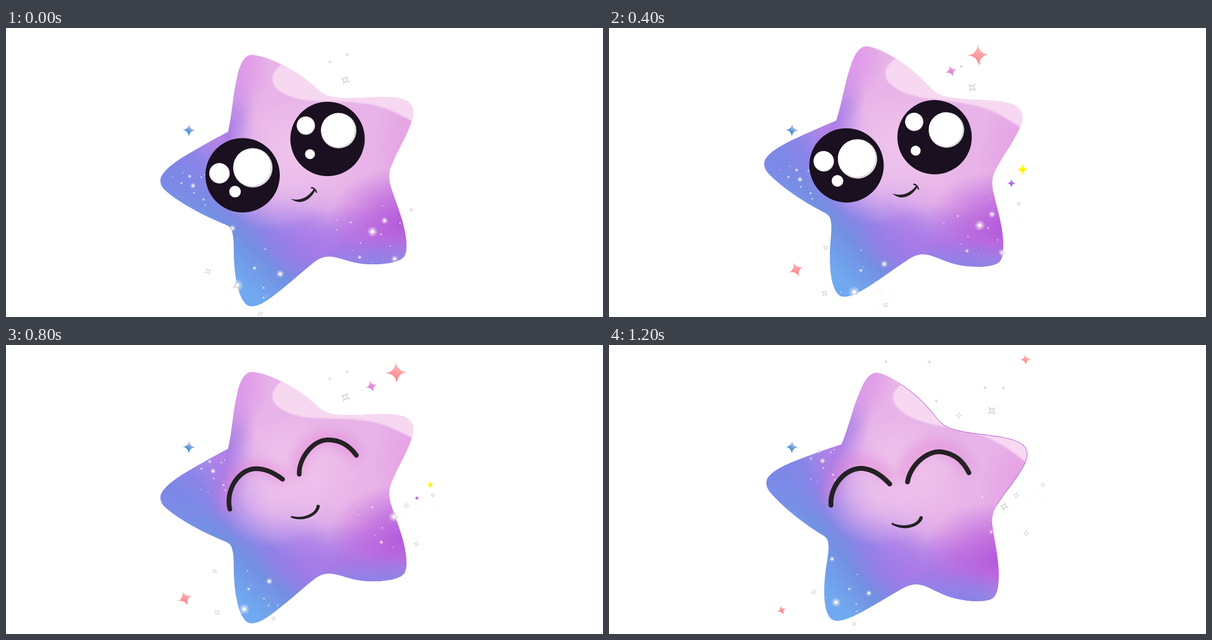
Animation of 1075 by 521 pixels, one loop 1400 ms. Source, as an HTML page with a canvas:

```html
<!DOCTYPE html>
<html lang="en">
<head>
<meta charset="utf-8">
<title>Smiling star</title>
<style>
html, body { margin: 0; width: 100%; height: 100%; overflow: hidden; background: #fff; }
canvas { display: block; }
</style>
</head>
<body>
<canvas id="stage" width="1075" height="521"></canvas>
<script>
const ctx = document.getElementById('stage').getContext('2d');
const STEP = 200, STEPS = 7;
const RAD = Math.PI / 180;
const mix = (a, b, u) => a + (b - a) * u;

const body = new Path2D(`M400,187 C408,150 409,115 417,85 C422,62 431,49 442,48.5
  C465,49 500,66 525,82 C548,97 562,113 573,119 C585,127 612,127 640,126
  C670,124.5 695,123 713,128 C728,132 735,143 733,157 C729,182 710,212 698,239
  C690,256 688,266 692,283 C700,310 716,345 720,377 C722,395 722,403 717,412
  C708,423 680,426.5 655,426 C630,425 615,419 600,415 C582,410 570,411 555,422
  C530,442 500,470 473,489 C457,500 446,503.5 437,501 C420,493 413,455 411,425
  C409,400 412,380 406,364 C402,355 395,355 380,348 C345,333 310,312 292,297
  C280,288 277,280 278.5,271 C283,258 300,244 325,229 C350,214 375,200 400,187Z`);
const shine = new Path2D(`M499,64 C478,76 472,99 492,113 C515,129 545,132 575,132
  C610,133 640,134 662,139 C692,146 712,158 736,170 L780,120 L600,60Z`);
const lids = new Path2D(`M403,296 C395,262 418,225 448,223 C468,222 485,232 498,242
  M528,233 C527,205 552,171 580,171 C605,171 621,185 631,199`);
const openSmile = new Path2D(`M513,308 C530,313 546,304 555,289 L557,292
  C549,310 530,321 513,308Z`);
const smileTip = new Path2D('M550,288 Q556,288 559,296');
const shutSmile = new Path2D(`M513,308 C535,314 557,304 559,291 A3,3 0 0 1 565,291
  C563,306 538,321 513,311Z`);

// Body poses: centre x, centre y, lean, scale
const rest = [502.5, 232.5, 0, 1];
const tilted = [507, 222, 5.4, 1];
const lean = [510.2, 233, 9.8, 1];
const dropped = [512, 241.6, 9.8, 1];
const droppedFace = [511.8, 241.8, 9.8, 1.03];
const poses = [rest, rest, tilted, rest, rest, lean, dropped];

// Slow rise from 0 to 1 over the loop
const rise = n => .5 - .5 * Math.cos(.62 * (n - .6));

// Glitter clusters: a few large glints (x, y, radius) and a random dust of small ones
const clusters = [
  { big: [0,0,7, 66,-46,4.5, -43,-94,4, -58,-6,5, 57,34,4, 19,-40,2.5], dust: 16, spread: 85, spin: 45,
    pose: n => [426 + 17 * Math.sin(.9 * (n - .7)), 464 + 14 * Math.sin(n * Math.PI / 6),
      20 * Math.cos(n), 1 - .04 * n] },
  { big: [0,0,6, 22,-20,4, 40,49,4, 70,-39,3, -23,46,2.5], dust: 15, spread: 70, spin: 10,
    pose: n => [mix(658, 712, rise(n)), mix(370, 290, rise(n)), 0, 1] },
  { big: [0,0,3.2, -6,-17,2.3, 19,25,1.7], dust: 9, spread: 42, spin: 5,
    pose: n => [mix(335, 385, rise(n)), mix(287, 208, rise(n)), 0, 1] },
  { big: [0,0,7, -28,-33,2, 3,-46,2.2], dust: 0, spread: 0, spin: 25,
    pose: (n, tilt) => [611 + 8 * tilt, 94 + 2.5 * tilt, 2.4 * tilt, 1] },
  { big: [0,0,2.5, 53,96,4.5, -78,-1,2, 12,70,2], dust: 0, spread: 0, spin: 5,
    pose: (n, tilt) => [577, 31, 0, tilt > 6 ? 1 : 0] }
];

let seed = 11;
function random() {
  seed = seed * 16807 % 2147483647;
  return seed / 2147483647;
}
for (const k of clusters) {
  k.points = [...k.big];
  for (let i = 0; i < k.dust; i++) {
    const a = random() * 2 * Math.PI, d = k.spread * Math.sqrt(random());
    k.points.push(d * Math.cos(a), d * Math.sin(a), .8 + random() ** 2);
  }
}

// Coloured stars travel from one point to another and swell around the step "peak"
const stars = [
  { light: '#fbb9b6', dark: '#fd8a93', tilt: -3, from: [653, 63], to: [750, 27], bend: 1.3,
    hop: 9, size: [10, 34], peak: 3, last: 6 },
  { light: '#f3a6dc', dark: '#d97bd8', tilt: -18, from: [613, 89], to: [703, 62], bend: 2.4,
    hop: 6, size: [7, 16], peak: 3, last: 5 },
  { light: '#fff700', dark: '#fff000', tilt: 0, from: [735, 257], to: [764, 252], bend: 1,
    hop: 0, size: [5, 12], peak: 2.6, last: 4 },
  { light: '#bb7be0', dark: '#a75fd6', tilt: 0, from: [717, 282], to: [740, 276], bend: 1,
    hop: 0, size: [4, 9], peak: 2.5, last: 4 },
  { light: '#fbb4b4', dark: '#fb858f', tilt: -22, from: [353, 425], to: [311, 478], bend: .6,
    hop: 0, size: [9, 21.5], peak: 3, last: 6 }
];

function disc(x, y, r, fill) {
  ctx.fillStyle = fill;
  ctx.beginPath();
  ctx.arc(x, y, r, 0, 7);
  ctx.fill();
}

function fourPoint(r, pinch) {
  const c = r * pinch;
  ctx.beginPath();
  ctx.moveTo(0, -r);
  ctx.quadraticCurveTo(c, -c, r, 0);
  ctx.quadraticCurveTo(c, c, 0, r);
  ctx.quadraticCurveTo(-c, c, -r, 0);
  ctx.quadraticCurveTo(-c, -c, 0, -r);
  ctx.closePath();
}

function at(x, y, angle, draw) {
  ctx.save();
  ctx.translate(x, y);
  ctx.rotate(angle * RAD);
  draw();
  ctx.restore();
}

const matrix = ([x, y, angle, scale]) => new DOMMatrix()
  .translate(x, y).rotate(angle).scale(scale).translate(-rest[0], -rest[1]);

function posed(pose, draw) {
  ctx.save();
  ctx.setTransform(matrix(pose));
  draw();
  ctx.restore();
}

function blob(x, y, rx, ry, rgb, alpha, angle = 0) {
  at(x, y, angle, () => {
    ctx.scale(rx, ry);
    const g = ctx.createRadialGradient(0, 0, 0, 0, 0, 1);
    g.addColorStop(0, `rgba(${rgb},${alpha})`);
    g.addColorStop(.5, `rgba(${rgb},${alpha * .6})`);
    g.addColorStop(1, `rgba(${rgb},0)`);
    disc(0, 0, 1, g);
  });
}

function triples(list, visit) {
  for (let i = 0; i < list.length; i += 3) visit(list[i], list[i + 1], list[i + 2]);
}

function glitter(n) {
  const out = [];
  for (const k of clusters) {
    const [x, y, angle, scale] = k.pose(n, poses[n][2]);
    if (!scale) continue;
    const c = Math.cos(angle * RAD) * scale, s = Math.sin(angle * RAD) * scale;
    triples(k.points, (px, py, r) => out.push({
      x: x + px * c - py * s, y: y + px * s + py * c, r: r * scale, spin: k.spin + angle
    }));
  }
  return out;
}

// Grey look against the white page
function outlineGlint({ x, y, r, spin }) {
  if (r < 1.6) return disc(x, y, r * .7, '#e4e4e4');
  at(x, y, spin, () => {
    ctx.lineWidth = .8;
    ctx.strokeStyle = '#c2c2c2';
    ctx.fillStyle = '#fff';
    fourPoint(r * 1.2, .12);
    ctx.fill();
    ctx.stroke();
    if (r > 5.5) {
      disc(0, 0, r * .62, '#d2d2d2');
      disc(0, 0, r * .45, '#f5f5f5');
    }
  });
}

// White glow on the skin
function glowGlint({ x, y, r, spin }) {
  if (r > 3) at(x, y, spin, () => {
    fourPoint(r * 1.6, 0);
    ctx.fillStyle = 'rgba(255,255,255,.3)';
    ctx.fill();
  });
  blob(x, y, r * 1.7, r * 1.7, '255,245,235', .7);
  disc(x, y, r * .45, '#fff');
}

function skin(shut) {
  const g = ctx.createLinearGradient(560, 260, 400, 440);
  [[0, '#e7b3e8'], [.18, '#dcaae9'], [.36, '#b68dea'], [.56, '#9182e8'],
    [.74, '#738fe1'], [1, '#70a9f0']].forEach(s => g.addColorStop(...s));
  ctx.fillStyle = g;
  ctx.fillRect(200, 0, 620, 580);
  blob(290, 270, 130, 100, '128,134,232', .8);
  blob(400, 195, 46, 125, '170,124,230', .95, 8);
  blob(422, 70, 55, 80, '220,146,232', .8);
  blob(735, 215, 75, 130, '229,156,227', .8);
  blob(610, 395, 160, 75, '164,116,230', .85);
  blob(720, 350, 140, 100, '178,86,219', 1);
  blob(685, 440, 150, 62, '130,130,230', 1);
  blob(482, 278, 100, 88, '230,184,236', .95);
  blob(520, 225, 125, 105, '241,198,236', .85);
  ctx.save();
  if (shut) {
    ctx.filter = 'blur(9px)';
    ctx.lineWidth = 26;
    ctx.lineCap = 'round';
    ctx.strokeStyle = 'rgba(224,120,208,.38)';
    ctx.translate(-4, -4);
    ctx.stroke(lids);
    ctx.translate(4, 4);
  }
  ctx.filter = 'blur(1.5px)';
  ctx.fillStyle = '#f7d8f1';
  ctx.fill(shine);
  ctx.restore();
}

function openEye(x, y, whites) {
  disc(x, y, 67, '#1a1020');
  triples(whites, (wx, wy, r) => {
    disc(wx, wy, r, '#d9d9d9');
    disc(wx - r * .04, wy - r * .03, r * .95, '#fff');
  });
}

function face(shut) {
  ctx.strokeStyle = ctx.fillStyle = '#242224';
  ctx.lineCap = 'round';
  if (shut) {
    ctx.lineWidth = 8.5;
    ctx.stroke(lids);
    ctx.fill(shutSmile);
    return;
  }
  ctx.fill(openSmile);
  ctx.lineWidth = 2.4;
  ctx.stroke(smileTip);
  openEye(426, 265.5, [444.5,252,35.5, 384.5,262,18.5, 412.5,295,10.5]);
  openEye(579, 200, [599,185,32, 540,176,16.5, 547.5,227.5,9]);
}

function colourStar(x, y, r, tilt, light, dark) {
  at(x, y, tilt, () => {
    const g = ctx.createLinearGradient(r * .35, -r * .6, -r * .2, r * .5);
    g.addColorStop(0, light);
    g.addColorStop(1, dark);
    ctx.fillStyle = g;
    fourPoint(r, .09);
    ctx.fill();
  });
}

function travel(s, n) {
  if (n < 1 || n > s.last) return;
  const u = (n - 1) / (s.last - 1);
  const swell = Math.exp(-(((n - s.peak) / 1.05) ** 2));
  const hop = s.hop * Math.cos(2.1 * (n - 3.8));
  colourStar(mix(s.from[0], s.to[0], u ** s.bend), mix(s.from[1], s.to[1], u) + hop,
    mix(...s.size, swell), s.tilt, s.light, s.dark);
}

function draw(n) {
  const shut = n > 2, pose = poses[n], falls = pose == dropped;
  const glints = glitter(n);
  ctx.clearRect(0, 0, 1075, 521);
  glints.forEach(outlineGlint);

  ctx.save();
  const outline = new Path2D();
  outline.addPath(body, matrix(pose));
  ctx.clip(outline);
  // The shading stays behind when the outline drops, baring a purple rim
  posed(falls ? lean : pose, () => skin(shut));
  if (falls) {
    const rim = ctx.createLinearGradient(520, 0, 530, 0);
    rim.addColorStop(0, 'rgba(184,102,220,0)');
    rim.addColorStop(1, '#b866dc');
    ctx.save();
    ctx.beginPath();
    ctx.rect(520, 0, 300, 288);
    ctx.clip();
    ctx.strokeStyle = rim;
    ctx.lineWidth = 2;
    ctx.stroke(outline);
    ctx.restore();
  }
  glints.forEach(glowGlint);
  ctx.restore();

  posed(falls ? droppedFace : pose, () => face(shut));
  colourStar(329.5, 184, 11.5, 2, '#c9c4ea', '#2f86cc');
  stars.forEach(s => travel(s, n));
}

const start = performance.now();
let shown = -1;
function tick() {
  const n = Math.floor((performance.now() - start) / STEP) % STEPS;
  if (n != shown) draw(shown = n);
  requestAnimationFrame(tick);
}
tick();
</script>
</body>
</html>
```
